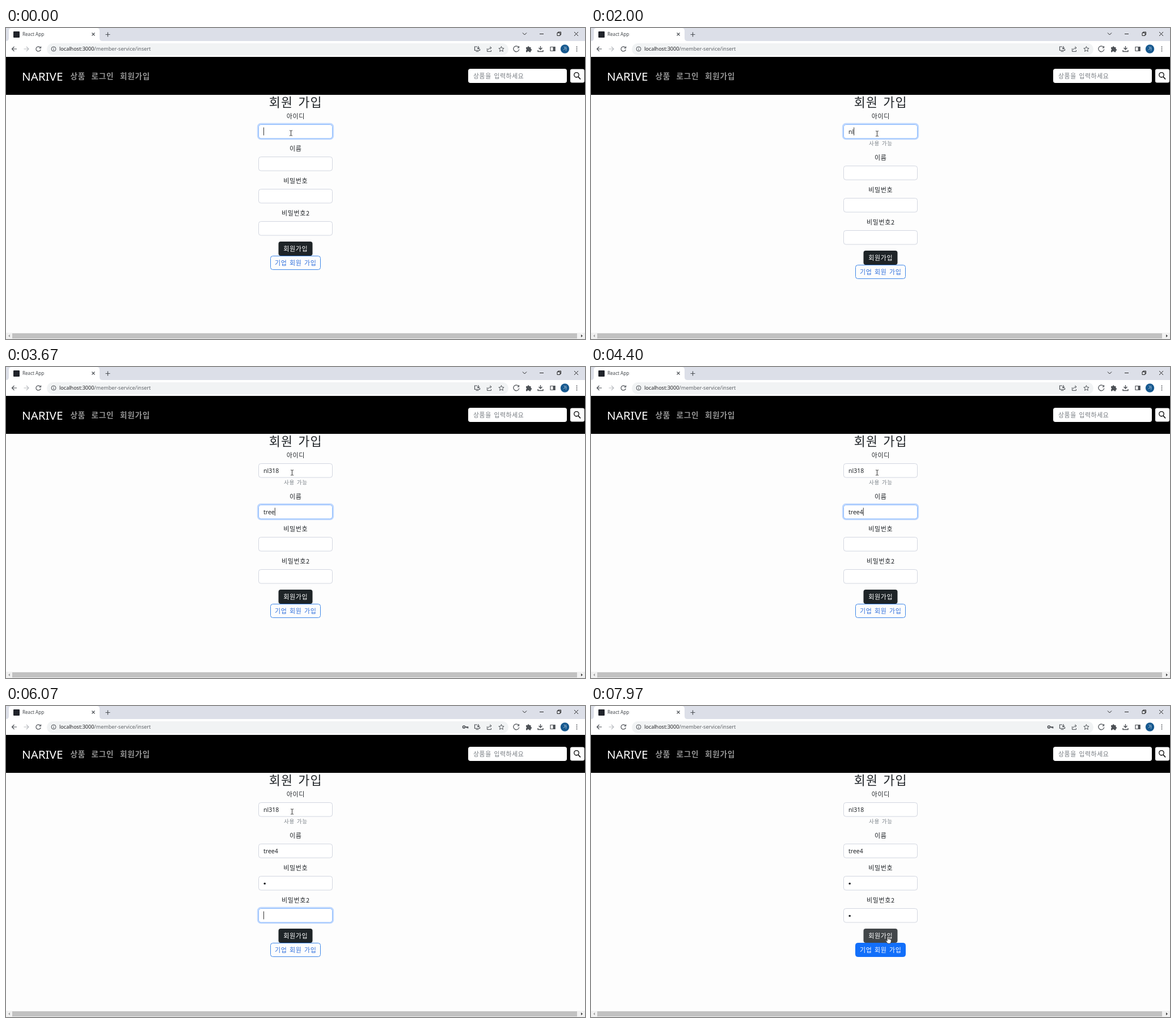
An HTML page for the animation above (8000 ms loop, 1021x549 px).

```html
<!DOCTYPE html>
<html lang="ko">
<head>
<meta charset="utf-8">
<title>Sign-up form</title>
<style>
  html, body { margin: 0; width: 100%; height: 100%; overflow: hidden; background: #fdfdfd; }
  svg { display: block; width: 1021px; height: 549px; }
  text { font-family: "Noto Sans", "Open Sans", "Noto Sans CJK KR", "Noto Sans CJK", sans-serif; white-space: pre; }
  .ko { font-family: "Noto Sans CJK KR", "Noto Sans CJK", sans-serif; letter-spacing: .055em; word-spacing: .08em; }
  .line { fill: none; stroke: #4d5156; stroke-width: 1.2; }
</style>
</head>
<body>
<svg id="stage" viewBox="0 0 1021 549"></svg>
<script>
const LOOP = 8000, SHIFT = 16, INK = '#212529';
const stage = document.getElementById('stage');
const $ = id => document.getElementById(id);

const rect = (x, y, w, h, fill, r = 0, extra = '') =>
  `<rect x="${x}" y="${y}" width="${w}" height="${h}" rx="${r}" fill="${fill}" ${extra}/>`;
const latin = (x, y, size, str, fill, extra = '') =>
  `<text x="${x}" y="${y}" font-size="${size}" fill="${fill}" ${extra}>${str}</text>`;
const korean = (x, cy, size, str, fill, extra = '') =>
  `<text class="ko" x="${x}" y="${cy + size * 0.38}" font-size="${size}" fill="${fill}" ${extra}>${str}</text>`;
const centered = (cy, size, str, fill, extra = '') =>
  korean(510.8, cy, size, str, fill, 'text-anchor="middle" ' + extra);
const line = (d, extra = '') => `<path class="line" d="${d}" ${extra}/>`;
const dot = (x, y, r, fill) => `<circle cx="${x}" cy="${y}" r="${r}" fill="${fill}"/>`;

function browserBar() {
  return rect(0, 0, 1021, 24, '#dcdfe8') +
    '<path d="M0 23Q5 23 5 18V5Q5 0 10 0H160Q165 0 165 5V18Q165 23 170 23Z" fill="#fff"/>' +
    rect(13, 6, 11, 11, '#20232a', 1) +
    latin(29, 14, 8.1, 'React App', '#45494d') +
    line('M151.5 8.5l5 5m0-5l-5 5M175.5 11.5h8m-4-4v8') +
    line('M911 8.5l3.5 3.5l3.5-3.5M941 10.5h7M972 8.5h5v5h-5zM973.5 8.5v-1.5h5v5h-1.5M1002 7l7 7m0-7l-7 7', 'style="stroke:#222;stroke-width:1"') +
    rect(0, 23, 1021, 28, '#fff') + rect(72, 27, 814, 21, '#f1f3f4', 10.5) +
    line('M19 37H10.5m4-4l-4 4l4 4') +
    line('M31.500 37h8.500m-4-4l4 4l-4 4', 'style="stroke:#b9bcc0"') +
    line('M60.500 34.500a4.200 4.200 0 1 0 .7 3.500M61.500 32.500v3h-3') +
    '<circle class="line" cx="84" cy="37" r="4" style="stroke-width:1"/>' + line('M84 36.500v3M84 34.500v1', 'style="stroke-width:1"') +
    latin(94, 40.4, 9.05, 'localhost:3000<tspan fill="#5f6368">/member-service/insert</tspan>', '#202124') +
    line('M831 33h-4.500v6.500h9V37M828.500 41.500h5M833 32v5m-2-2l2 2l2-2') +
    line('M848.500 36v5.500h7V39M850.500 39q0-4 5-4m-2-2.500l2.500 2.500l-2.500 2.500', 'style="stroke-width:1"') +
    line('M873.500 32.500l1.300 3.100l3.300.3l-2.500 2.200l.8 3.300l-2.900-1.800l-2.900 1.800l.8-3.300l-2.500-2.200l3.300-.3z', 'style="stroke-width:1"') +
    line('M904 34a5 5 0 1 0 .8 3.500M904.500 32v3h-3') +
    '<path d="M917 34h2.500a1.700 1.700 0 0 1 3.400 0h2.600v3a1.600 1.600 0 0 1 0 3.200v2.300h-3a1.600 1.600 0 0 0-3.200 0H917v-3a1.600 1.600 0 0 0 0-3z" fill="#4d5156"/>' +
    line('M942.500 32v6m-3-3l3 3l3-3M938 39v2.500h9V39', 'style="stroke-width:1.400"') +
    line('M960 33.500h8v7h-8z') + rect(964.5, 33, 4, 8, '#4d5156') +
    dot(985.5, 37, 7.7, '#17598f') + korean(985.8, 36.7, 6.5, '가', '#fff', 'text-anchor="middle"') +
    [33.5, 37, 40.5].map(y => dot(1006.5, y, 1, '#4d5156')).join('') +
    `<g id="key">${line('M809 37h5.500v2.500M812.500 37v2', 'style="stroke-width:1.700"')}
      <circle cx="807.500" cy="37" r="2" fill="none" stroke="#4d5156" stroke-width="1.700"/></g>`;
}

function navBar() {
  const link = (x, str) => korean(x, 85, 13.6, str, '#949494', 'font-weight="700"');
  return rect(0, 51, 1021, 67, '#000') +
    latin(28, 93, 20.6, 'NARIVE', '#fff') +
    link(113.5, '상품') + link(150.5, '로그인') + link(201, '회원가입') +
    rect(815, 72, 174, 25, '#fff', 4) + korean(824, 84.5, 10.9, '상품을 입력하세요', '#767b80') +
    rect(995, 72.5, 25, 24, '#fff', 3) +
    '<circle cx="1006" cy="82.800" r="4.200" fill="none" stroke="#000" stroke-width="1.300"/>' +
    '<path d="M1009 86l4 4.500" stroke="#000" stroke-width="1.600"/>';
}

const fieldTops = [170, 227, 284, 341];
const labels = ['아이디', '이름', '비밀번호', '비밀번호2'];

const field = (top, i) => centered(top - 14, 11, labels[i], INK) +
  rect(444.2, top - 0.8, 132.6, 26.6, 'none', 5, `id="ring${i}" stroke="#0d6efd" stroke-opacity=".25" stroke-width="2.700"`) +
  rect(445.5, top + 0.5, 130, 24.5, '#fff', 4, `id="box${i}" stroke-width="1"`) +
  (i < 2 ? latin(454, top + 17, 10.5, '', INK, `id="value${i}"`)
         : `<g id="value${i}">${dot(456.2, top + 13.5, 1.8, INK)}</g>`) +
  rect(454, top + 5.5, 1, 14, '#333', 0, `id="caret${i}"`);

function form() {
  return centered(131, 21.8, '회원 가입', INK) + field(170, 0) +
    `<g id="hint">${centered(203, 9.6, '사용 가능', '#7b8288')}</g>
    <g id="lower">${[1, 2, 3].map(i => field(fieldTops[i], i)).join('')}
      ${rect(480.5, 377, 60, 25, INK, 4, 'id="join"')}${centered(389.5, 11, '회원가입', '#fff')}
      ${rect(466.5, 402.5, 88, 24, '#fff', 4, 'id="company" stroke="#3d86e8"')}
      ${centered(414.5, 11, '기업 회원 가입', '#0d6efd', 'id="companyText"')}</g>`;
}

const scrollBar = () => rect(0, 538, 1021, 11, '#f1f1f1') + rect(11, 539, 996, 9, '#c1c1c1') +
  '<path d="M7 541v5l-3-2.500z" fill="#a3a3a3"/><path d="M1014 541v5l3-2.500z" fill="#444"/>';

const cursors = `<g id="pointer">
  <path id="beam" d="M-2.500-4.500h2l.5.5l.5-.5h2M0-4v8M-2.500 4.500h2L0 4l.5.5h2" fill="none" stroke="#333" stroke-width="1"/>
  <path id="arrow" d="M-2-6v11l2.600-2.300l1.700 3.800l1.600-.7l-1.700-3.700h3.500z" fill="#fff" stroke="#222" stroke-width=".8"/>
  <path id="hand" d="M-2.300 2V-5Q-2.300-6.200-1.300-6.200T-.3-5v3.500q1-.7 1.700.3q1-.6 1.700.4q1.700-.5 1.700 1V3L3.500 6.200h-5L-4.800 1.500q-.2-1.400 1-1z" fill="#fff" stroke="#222" stroke-width=".8"/></g>`;

stage.innerHTML = rect(0, 0, 1021, 549, '#fdfdfd') + browserBar() + navBar() + form() + scrollBar() + cursors;

const keys = [[1700, 1850, 2010, 2140, 2400], [3060, 3220, 3400, 3580, 3950], [5300], [6250]];
const words = ['nl318', 'tree4'];
const focusTimes = [-430, 2690, 4880, 5650, 7780];
const path = [[0, 502.5, 185.5], [1500, 502.5, 185.5], [1640, 504.5, 186.5], [6280, 504.5, 186.5],
  [6520, 516, 400], [6640, 520, 464], [6750, 520, 460], [7080, 519.5, 447], [7130, 519.5, 447],
  [7450, 521.5, 431], [7700, 524.5, 413], [LOOP, 524.5, 413]];

const ease = (t, start, length = 150) => {
  const u = Math.min(1, Math.max(0, (t - start) / length));
  return u * u * (3 - 2 * u);
};
const mix = (a, b, u) => `rgb(${a.map((v, i) => Math.round(v + (b[i] - v) * u))})`;
const show = (id, on) => $(id).setAttribute('visibility', on ? 'visible' : 'hidden');

function pointerAt(t) {
  const i = path.findIndex(p => p[0] > t);
  const a = path[i - 1], b = path[i], u = ease(t, a[0], b[0] - a[0]);
  return [a[1] + (b[1] - a[1]) * u, a[2] + (b[2] - a[2]) * u];
}

function drawFields(t) {
  fieldTops.forEach((_, i) => {
    const focus = i ? ease(t, focusTimes[i]) - ease(t, focusTimes[i + 1]) : 1 - ease(t, focusTimes[1]);
    $('ring' + i).setAttribute('opacity', focus);
    $('box' + i).setAttribute('stroke', mix([210, 214, 224], [134, 183, 254], focus));
    const typed = keys[i].filter(k => k <= t);
    const value = $('value' + i);
    let width = 0;
    if (i < 2) {
      value.textContent = words[i].slice(0, typed.length);
      width = typed.length ? value.getComputedTextLength() : 0;
    } else {
      show('value' + i, typed.length);
      width = typed.length * 4.5;
    }
    const lastInput = Math.max(focusTimes[i], ...typed);
    const active = t >= focusTimes[i] && t < focusTimes[i + 1];
    show('caret' + i, active && (t - lastInput) % 1060 < 530);
    $('caret' + i).setAttribute('x', 454 + width);
  });
}

function draw(t) {
  const checked = t >= keys[0][0];
  show('hint', checked);
  $('lower').setAttribute('transform', `translate(0 ${checked ? SHIFT : 0})`);
  show('key', t >= keys[2][0]);
  drawFields(t);

  const companyHover = ease(t, 7110);
  $('company').setAttribute('fill', mix([253, 253, 253], [18, 111, 250], companyHover));
  $('company').setAttribute('stroke', mix([61, 134, 232], [18, 111, 250], companyHover));
  $('companyText').setAttribute('fill', mix([45, 110, 220], [255, 255, 255], companyHover));
  $('join').setAttribute('fill', mix([30, 36, 39], [66, 70, 73], ease(t, 7560)));

  const [x, y] = pointerAt(t), tip = y - 6;
  $('pointer').setAttribute('transform', `translate(${x} ${y})`);
  show('beam', tip < 393);
  show('hand', tip >= 393 && tip < 443);
  show('arrow', tip >= 443);
}

const start = performance.now();
function tick() {
  draw((performance.now() - start) % LOOP);
  requestAnimationFrame(tick);
}
tick();
</script>
</body>
</html>
```
